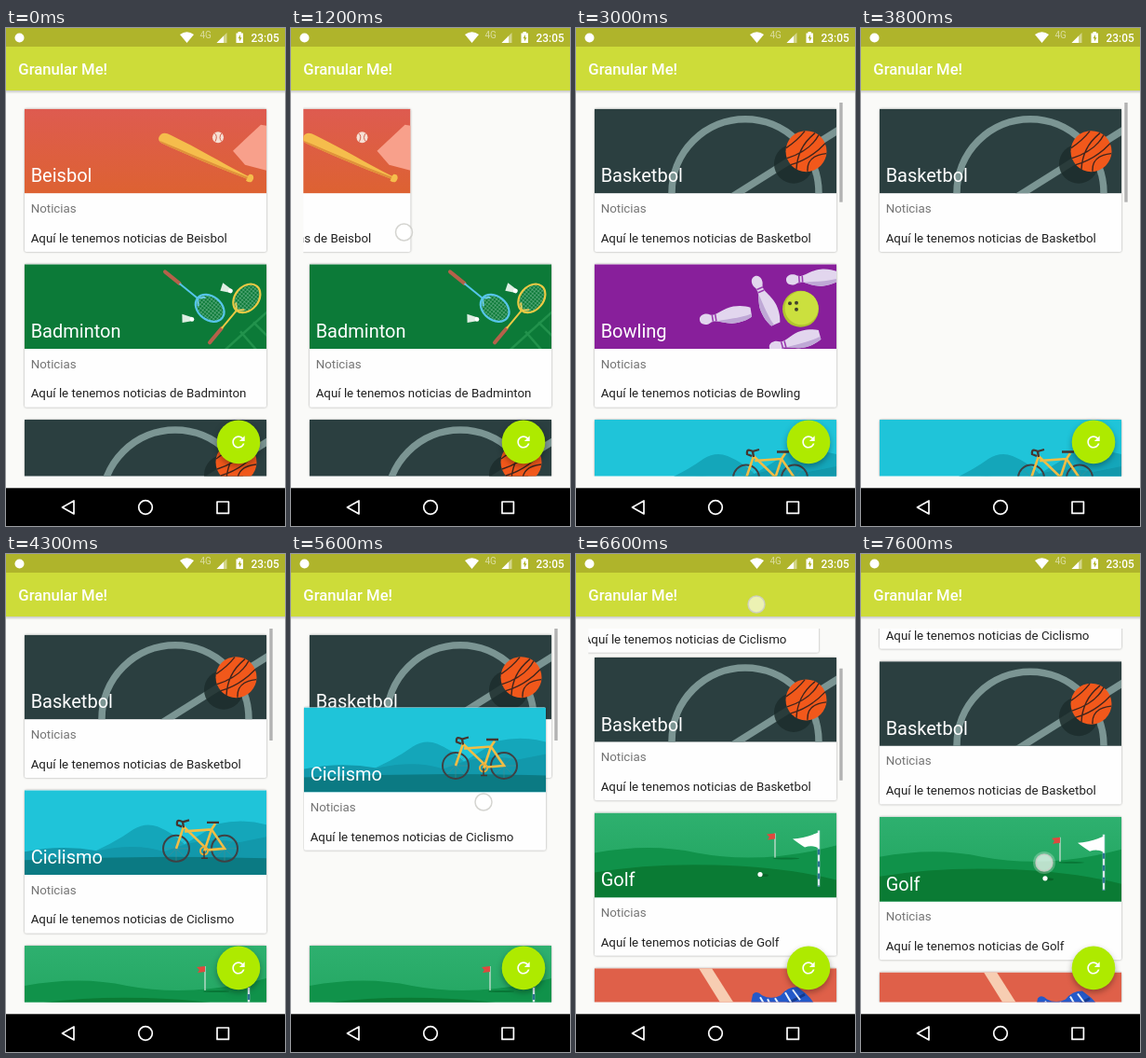
An HTML page that plays this animation: 300 by 534 pixels, repeating every 8 s.

```html
<!DOCTYPE html>
<html lang="es">
<head>
<meta charset="utf-8">
<title>Sports cards</title>
<style>
html, body { margin: 0; width: 100%; height: 100%; overflow: hidden; background: #fafaf8; }
#stage { display: block; width: 300px; height: 534px; font-family: Roboto, sans-serif; }
.paper { fill: #fefefe; filter: drop-shadow(0 .9px 1px rgba(0,0,0,.36)); }
.name { font-size: 20px; fill: #fff; }
.sub { font-size: 13.33px; fill: #757575; }
.info { font-size: 13.33px; fill: #212121; }
.fab { fill: #aeea00; filter: drop-shadow(0 3px 3px rgba(0,0,0,.32)); }
.touch { fill: rgba(255,255,255,.62); stroke: rgba(205,205,200,.85); stroke-width: 1.5; }
</style>
</head>
<body>
<svg id="stage" viewBox="0 0 300 534">
  <defs>
    <clipPath id="listClip"><rect x="13.3" y="80" width="273.4" height="400.6"/></clipPath>
    <linearGradient id="shade" x2="0" y2="1">
      <stop stop-opacity=".22"/><stop offset="1" stop-opacity="0"/>
    </linearGradient>
    <linearGradient id="clay" x2="0" y2="1">
      <stop stop-color="#de5b50"/><stop offset="1" stop-color="#dd6232"/>
    </linearGradient>
    <linearGradient id="lawn" x2="0" y2="1">
      <stop stop-color="#2eb06f"/><stop offset="1" stop-color="#1fa25c"/>
    </linearGradient>
    <pattern id="net" width="3" height="3" patternUnits="userSpaceOnUse">
      <path d="M0 0H3M0 0V3" stroke="#b9e6d2" stroke-width=".8" opacity=".75"/>
    </pattern>
    <g id="pin">
      <path d="M0 0C0-6 8-7 12-4C18-1 26-9 38-9C46-9 52-7 56-5V5C52 7 46 9 38 9C26 9 18 1 12 4C8 7 0 6 0 0Z" fill="#e2d6ee"/>
      <path d="M12 4C18 1 26 9 38 9C46 9 52 7 56 5V2C42 5 28 3 12 4Z" fill="#bfa8d6"/>
      <path d="M14-3.5V3.5M17.5-3.5V3.5" stroke="#9a3bb0" stroke-width="1.6"/>
    </g>
    <g id="racket">
      <path d="M0 0H20" stroke="#b5614a" stroke-width="4" stroke-linecap="round"/>
      <path d="M20 0H45M45 0L51-6M45 0L51 6" stroke="currentColor" stroke-width="2" fill="none"/>
      <ellipse cx="62" rx="17" ry="12.5" fill="url(#net)" stroke="currentColor" stroke-width="2.2"/>
    </g>
    <g id="cock">
      <path d="M-6-4L5-1.5V2.5L-5 5Z" fill="#dfeee3"/><circle cx="5" cy=".5" r="2.4" fill="#fff"/>
    </g>
  </defs>

  <rect width="300" height="534" fill="#fafaf8"/>
  <rect y="66.7" width="300" height="4" fill="url(#shade)"/>
  <g id="list" clip-path="url(#listClip)"></g>
  <rect id="bar" x="283.3" width="3.4" fill="#b2b2b2"/>

  <rect width="300" height="20" fill="#afb42b"/>
  <rect y="20" width="300" height="47" fill="#cddc39"/>
  <text x="13.3" y="50" font-size="16.67" font-weight="500" fill="#fff">Granular Me!</text>
  <g fill="#fff">
    <circle cx="14.5" cy="10.5" r="5"/>
    <path d="M194.5 16L187 7Q194.500 1.500 202 7Z"/>
    <text x="208.500" y="11" font-size="10" opacity=".55">4G</text>
    <path d="M226.500 16H237.500V5Z" opacity=".45"/>
    <path d="M226.500 16H234V8.500Z"/>
    <path d="M247.500 5.500H249.500V4H253V5.500H255V16H247.500Z"/>
    <text x="263.500" y="14.800" font-size="11.9" font-weight="500">23:05</text>
  </g>
  <path d="M252 7L249.500 11.200H251V14.500L253.500 10.200H252Z" fill="#afb42b"/>

  <circle class="fab" cx="250" cy="443.900" r="23.300"/>
  <path transform="translate(240 433.900) scale(.8333)" fill="#fff" d="M17.650 6.350C16.200 4.900 14.210 4 12 4c-4.420 0-7.990 3.580-7.990 8s3.570 8 7.990 8c3.730 0 6.840-2.550 7.730-6h-2.080c-.82 2.330-3.040 4-5.650 4-3.310 0-6-2.690-6-6s2.690-6 6-6c1.660 0 3.140.69 4.220 1.780L13 11h7V4z"/>

  <rect y="493.300" width="300" height="41" fill="#000"/>
  <g fill="none" stroke="#fff" stroke-width="1.700" stroke-linejoin="round">
    <path d="M73 507V521L60.500 514Z"/>
    <circle cx="150" cy="514" r="7.300"/>
    <rect x="227" y="508" width="12.400" height="12.400"/>
  </g>
  <circle id="halo" r="12" fill="#fff" opacity=".25"/>
  <circle id="touch" class="touch" r="9"/>
</svg>

<script>
const fill = color => `<rect width="260" height="91" fill="${color}"/>`;
const use = (id, x, y, turn, color = '') =>
  `<use href="#${id}" color="${color}" transform="translate(${x} ${y}) rotate(${turn})"/>`;
const wheel = x => `<circle cx="${x}" cy="62.500" r="14" stroke="#3f4043" stroke-width="2"/>
  <path d="M${x - 13} 62.500h26M${x} 49.500v26M${x - 9} 53.500l18 18M${x + 9} 53.500l-18 18" stroke="#57888d" stroke-width=".5"/>`;

const sports = [
  ['Beisbol', fill('url(#clay)') + `
    <path d="M224 45L254 17L260 18V66L237 60Z" fill="#f8a08b"/>
    <path d="M147 27C143 30 143 35 148 37C172 48 205 62 239 75L238 77Q244 81 246 75Q247 70 242 70L240 72C212 58 190 44 157 28Q151 25 147 27Z" fill="#f5bd4c"/>
    <path d="M145 34Q146 36 148 37C172 48 205 62 239 75L240 73C205 60 172 45 145 34Z" fill="#e0913a"/>
    <circle cx="208" cy="30.500" r="6" fill="#f6e0d4"/>
    <path d="M204 26Q208 29 205 35M212 26Q208 31 212 35" fill="none" stroke="#d5614e"/>`],
  ['Badminton', fill('#0c7a38') + `
    <path d="M212 95L262 50M232 72L252 95M246 62L264 80" stroke="#22924c" stroke-width="2.500"/>`
    + use('racket', 151, 8, 39, '#56c5ea') + use('racket', 199, 84, -50, '#ecc944')
    + use('cock', 217, 26, 25) + use('cock', 175, 58, 5)],
  ['Basketbol', fill('#2b3f40') + `
    <g fill="none" stroke="#7b9593" stroke-width="7.500">
      <circle cx="162" cy="90" r="79"/><path d="M145 96L265 21"/>
    </g>
    <circle cx="214" cy="59" r="21" fill="#1d2d2c" opacity=".85"/>
    <circle cx="227.500" cy="45.500" r="22" fill="#f1581b"/>
    <path d="M207 53Q232 45 241 28M211 60Q232 54 248 37M206 42Q218 34 226 24M217 65Q218 41 237 26M229 67Q228 50 249 48" fill="none" stroke="#40251d" stroke-width="1.400"/>`],
  ['Bowling', fill('#881f9b')
    + use('pin', 113, 60, -9) + use('pin', 172, 13, 66) + use('pin', 206, 17, -4) + use('pin', 188, 90, -15) + `
    <circle cx="221.500" cy="48" r="19.500" fill="#b0c52d"/>
    <circle cx="222.500" cy="47" r="18" fill="#cbe03e"/>
    <g fill="#42432c"><circle cx="210" cy="42" r="2"/><circle cx="217" cy="41.500" r="2"/><circle cx="217" cy="48.500" r="2"/></g>`],
  ['Ciclismo', fill('#1fc4d9') + `
    <path d="M60 72Q95 58 117 42Q130 34 143 39Q160 46 172 58L208 36Q235 30 260 37V80H60Z" fill="#14a6ba"/>
    <path d="M0 66Q40 58 78 65Q120 56 150 66Q190 48 230 56L260 50V91H0Z" fill="#1298ab"/>
    <path d="M0 75Q130 69 260 73V91H0Z" fill="#0b7a83"/>
    <g fill="none">${wheel(163)}${wheel(215)}
      <path d="M163 62.500L171 39L197 64L215 62.500L201 42L172 44M201 42L193 66M205 36L201 42" stroke="#f2bd45" stroke-width="2.600"/>
      <path d="M171 40L170 34L177 32M170 34Q163 30 164 37L169 39M196 34.500H209" stroke="#45352f" stroke-width="2.300"/>
      <circle cx="193" cy="65" r="4" stroke="#e9ad3a" stroke-width="2"/>
      <path d="M193 65V73M190 73H197" stroke="#45352f" stroke-width="1.500"/>
    </g>`],
  ['Golf', fill('url(#lawn)') + `
    <path d="M0 43Q60 32 110 43Q180 56 260 35V91H0Z" fill="#10924a"/>
    <path d="M0 64Q60 54 130 56Q205 58 260 72V91H0Z" fill="#0a7b34"/>
    <ellipse cx="182" cy="67" rx="5" ry="1.500" fill="#086328"/>
    <ellipse cx="206" cy="49" rx="14" ry="1" fill="#087636"/>
    <path d="M194 22V48" stroke="#d8e3dc" stroke-width="1.200"/>
    <path d="M194 22L185 23L188 26L186 29L194 28Z" fill="#df493e"/>
    <path d="M241 19V79" stroke="#d7e8ef" stroke-width="2.400"/>
    <path d="M241 39V79" stroke="#2d7393" stroke-width="2.400" stroke-dasharray="6 7"/>
    <path d="M241 21Q226 27 213 28Q221 34 226 37Q234 34 241 38Z" fill="#fff"/>
    <circle cx="178" cy="66" r="2.600" fill="#fff"/>`],
  ['Running', fill('#df6049') + `
    <path d="M112 0H126L184 91H169Z" fill="#f7cdb2"/>
    <path d="M166 48L170 28Q174 23 180 29Q190 34 200 29Q207 20 218 20L227 27Q237 36 240 47L238 66Q205 70 166 60Z" fill="#2459c9"/>
    <path d="M170 38Q190 50 207 38L226 28M170 49Q200 57 238 47" fill="none" stroke="#153b91" stroke-width="3"/>
    <path d="M178 31L184 41M186 33L191 43M194 32L201 43M205 26L212 38M213 23L221 34" stroke="#e8effb" stroke-width="2"/>
    <path d="M166 52Q205 66 240 50" fill="none" stroke="#8fc8ee" stroke-width="3"/>`]
];

const PITCH = 166.67, TOP = 86.67, RIDER = 4, SWAP = 5700, DROP = 6800, LOOP = 8000;
const swipes = [
  { card: 0, at: 1000, y: 219 },
  { card: 1, at: 2100, y: 221 },
  { card: 3, at: 3440, y: 387 }
];
const swipePath = [[0, 0], [100, -58], [200, -151.500], [300, -235], [400, -310]];
const fingerX = [[5300, 213], [5500, 211], [5700, 203], [5900, 196], [6000, 194]];
const fingerY = [[5300, 355], [5400, 347], [5500, 322], [5600, 266], [5700, 185], [5800, 118], [5900, 78], [6000, 60], [6100, 54]];
const scrollPath = [[SWAP, 0], [6100, 13.500], [DROP, 28.500]];

const clamp = v => Math.max(0, Math.min(1, v));
const ease = v => .5 - Math.cos(Math.PI * clamp(v)) / 2;
function along(keys, t) {
  const i = keys.findIndex(k => k[0] > t);
  if (i === 0) return keys[0][1];
  if (i < 0) return keys[keys.length - 1][1];
  const [a, b] = [keys[i - 1], keys[i]];
  return a[1] + (b[1] - a[1]) * (t - a[0]) / (b[0] - a[0]);
}

const $ = id => document.getElementById(id);
$('list').innerHTML = sports.map(([name, art], i) => `
  <g id="card${i}">
    <rect class="paper" width="260" height="153.300" rx="1.700"/>
    <svg width="260" height="90.700">${art}</svg>
    <text class="name" x="6.670" y="78.800">${name}</text>
    <text class="sub" x="6.670" y="111.300">Noticias</text>
    <text class="info" x="6.670" y="143">Aquí le tenemos noticias de ${name}</text>
  </g>`).join('');
const cards = sports.map((_, i) => $('card' + i));
$('list').append(cards[RIDER]);

function showTouch(spot) {
  $('touch').style.display = spot ? '' : 'none';
  $('halo').style.display = spot && spot.halo ? '' : 'none';
  if (!spot) return;
  for (const el of [$('touch'), $('halo')]) el.setAttribute('transform', `translate(${spot.x} ${spot.y})`);
  $('touch').setAttribute('opacity', spot.alpha ?? 1);
}

function draw(t) {
  const x = sports.map(() => 20);
  const slot = sports.map((_, i) => i);
  let count = 11, spot = null;

  for (const s of swipes) {
    const u = t - s.at, dx = along(swipePath, u);
    const closed = ease((u - 500) / 360);
    x[s.card] += dx;
    slot.forEach((_, i) => { if (i > s.card) slot[i] -= closed; });
    if (u >= 500) count--;
    if (u >= 0 && u < 340) spot = { x: 273 + dx, y: s.y };
  }

  const scroll = along(scrollPath, t);
  const closeUp = ease((t - SWAP) / 250);
  const y = slot.map((p, i) => TOP + scroll + PITCH * (p - (i > RIDER ? closeUp : 0)));

  if (t >= 4700 && t < DROP) {
    spot = { x: along(fingerX, t), y: along(fingerY, t), alpha: t < 4800 ? .5 : 1 };
  }
  if (t >= 5300) {
    const back = ease((t - DROP + 50) / 250);
    const heldX = 20 + along(fingerX, t) - 213, heldY = along(fingerY, t) - 101.500;
    x[RIDER] = heldX + (20 - heldX) * back;
    y[RIDER] = heldY + (TOP + scroll - PITCH - heldY) * back;
  }
  if (t >= 7200) spot = { x: 197, y: 331, halo: true, alpha: clamp((t - 7100) / 300) };

  cards.forEach((el, i) => el.setAttribute('transform', `translate(${x[i]} ${y[i]})`));

  const ratio = 400 / (count * PITCH);
  const offset = t >= SWAP ? PITCH - scroll : 0;
  $('bar').setAttribute('y', 80 + offset * ratio);
  $('bar').setAttribute('height', 400 * ratio);
  $('bar').setAttribute('opacity', t < 1500 ? 0 : 1 - clamp((t - 7000) / 250));
  showTouch(spot);
}

const start = performance.now();
function tick() {
  const t = (performance.now() - start) % LOOP;
  draw(Math.floor(t / 100) * 100);
  requestAnimationFrame(tick);
}
tick();
</script>
</body>
</html>
```
